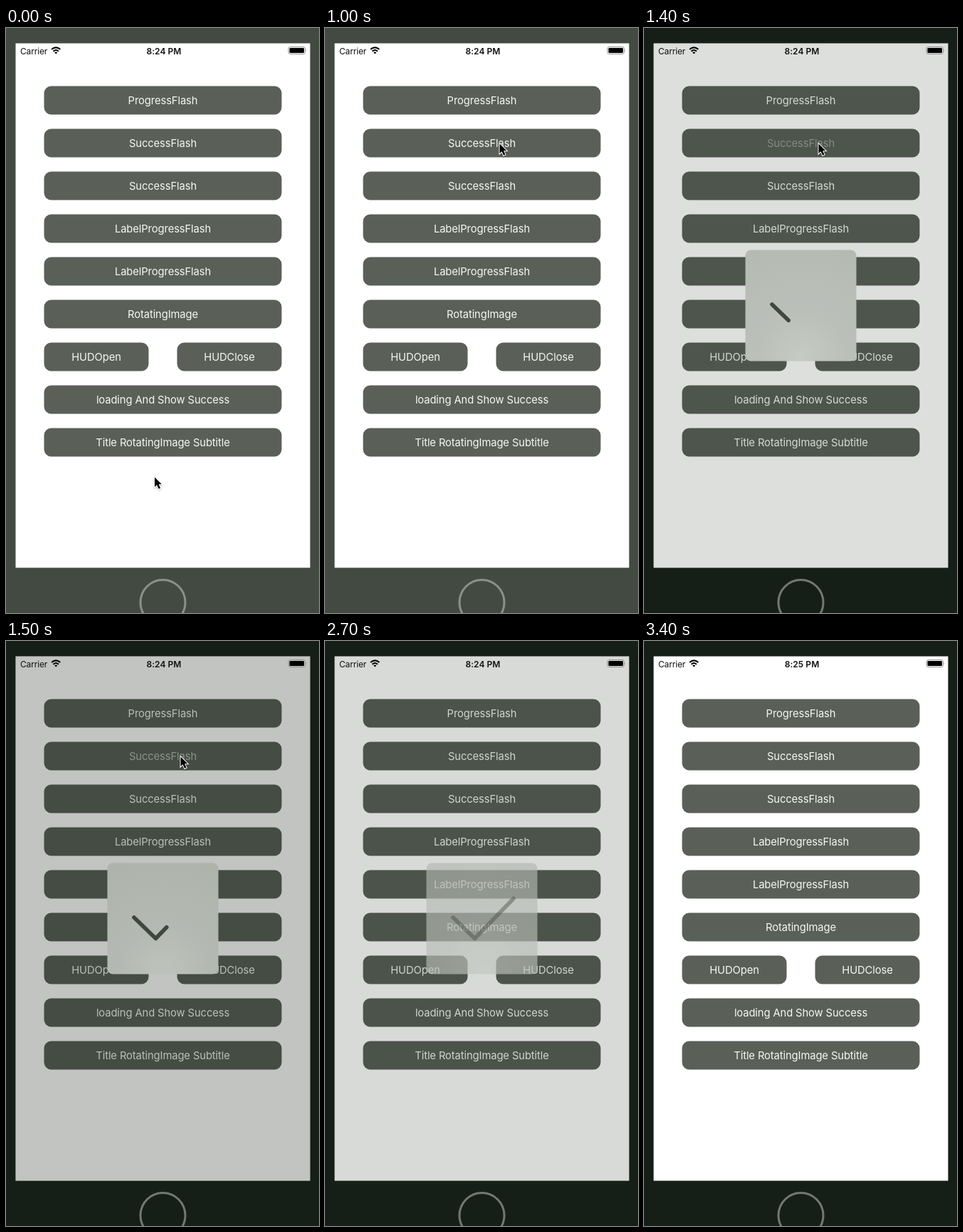
Animation of 440x821 px, one loop 3500 ms. Source, as an HTML page:

```html
<!DOCTYPE html>
<html lang="en">
<head>
<meta charset="utf-8">
<title>HUD demo</title>
<style>
  html, body { margin: 0; width: 100%; height: 100%; overflow: hidden; background: #434a42; }
  svg { display: block; width: 440px; height: 821px; }
  text { font-family: Inter, Roboto, sans-serif; }
  .label { font-size: 14.75px; letter-spacing: -.1px; fill: #f5f8f4; text-anchor: middle; }
  .status { font-size: 12px; letter-spacing: -.15px; fill: #111; }
  .clock { font-weight: 600; letter-spacing: .05px; text-anchor: middle; }
</style>
</head>
<body>
<svg viewBox="0 0 440 821">
  <defs>
    <radialGradient id="frost" gradientUnits="userSpaceOnUse" cx="222" cy="462" r="170">
      <stop offset="0" stop-color="#cdd2cb"/>
      <stop offset=".35" stop-color="#c3c8c1"/>
      <stop offset="1" stop-color="#bbc1b9"/>
    </radialGradient>
  </defs>
  <rect id="bezel" width="440" height="821"/>

  <!-- The phone sits half a pixel off the grid -->
  <g transform="translate(-.5 -.5)">
    <circle id="home" cx="221" cy="806.5" r="31.5" fill="none" stroke-width="3"/>
    <rect x="14" y="22" width="414" height="736" fill="#fff"/>
    <g id="buttons"></g>
    <rect id="shade" x="14" y="22" width="414" height="736" fill="#051005"/>

    <text class="status" x="20.5" y="37">Carrier</text>
    <g fill="none" stroke="#000" stroke-width="2.1">
      <path d="M64.6 30.6Q70.7 25 76.8 30.6"/>
      <path d="M67 33.2Q70.7 29.8 74.4 33.2"/>
      <path d="M70.7 37L68.7 34.8Q70.7 33.2 72.7 34.8Z" fill="#000" stroke="none"/>
    </g>
    <text id="clock" class="status clock" x="222.5" y="37"></text>
    <rect x="397.5" y="27" width="23.5" height="10" rx="2.6" fill="none" stroke="#8f958e"/>
    <rect x="399" y="28.5" width="20.5" height="7" rx="1.3"/>
    <path d="M422.2 30.3q1.5 1.7 0 3.4z" fill="#8f958e"/>

    <g id="panel">
      <rect x="143" y="312" width="156" height="156" rx="8" fill="url(#frost)"/>
      <rect id="dim" x="143" y="312" width="156" height="156" rx="8"/>
    </g>
    <path id="check" d="M180.5 388.5L211 418L265.5 362" pathLength="1" fill="none" stroke="#40473f"
      stroke-width="5.6" stroke-linecap="round" stroke-linejoin="round"/>
  </g>

  <path id="cursor" d="M0 0V13.6L3.1 10.7L5.6 16.3L8 15.2L5.6 9.8H9.8Z" fill="#000" stroke="#fff"
    stroke-width="2" paint-order="stroke" style="filter:drop-shadow(0 1px 1px #0004)"/>
</svg>
<script>
const LOOP = 3500, STEP = 100;
const PRESS = 1200, SHOW = 1300, HIDE = 2300, CURSOR_GONE = 1700, NEXT_MINUTE = 3200;
const $ = id => document.getElementById(id);
const set = (id, attrs) => {
  for (const name in attrs) $(id).setAttribute(name, attrs[name]);
};

const rows = [['ProgressFlash'], ['SuccessFlash'], ['SuccessFlash'], ['LabelProgressFlash'],
  ['LabelProgressFlash'], ['RotatingImage'], ['HUDOpen', 'HUDClose'],
  ['loading And Show Success'], ['Title RotatingImage Subtitle']];
const GAP = 40, WIDTH = 334;

function button(label, col, cols, row) {
  const w = (WIDTH - GAP * (cols - 1)) / cols;
  const x = 54 + col * (w + GAP), y = 82 + row * 60;
  return `<rect x="${x}" y="${y}" width="${w}" height="40" rx="10" fill="#5a6058"/>` +
    `<text class="label" x="${x + w / 2}" y="${y + 25.4}">${label}</text>`;
}
$('buttons').innerHTML = rows.flatMap((row, i) =>
  row.map((label, j) => button(label, j, row.length, i))).join('');
const pressed = document.querySelectorAll('.label')[1];

const progress = (t, from, length) => Math.min(1, Math.max(0, (t - from) / length));
const mix = (a, b, k) => a + (b - a) * k;
const smooth = k => k * k * (3 - 2 * k);
const easeOut = k => Math.sin(k * Math.PI / 2);
const easeIn = k => 1 - Math.cos(k * Math.PI / 2);

// A long sweep up, then a slow glide onto the button
function cursorAt(t) {
  const sweep = smooth(progress(t, 0, 600)), glide = progress(t, 600, 400);
  return [mix(209, 234.5, sweep) + 11 * glide, mix(630.5, 205, sweep) - 42.5 * glide];
}

function draw(t) {
  const active = t >= PRESS;
  const fade = 1 - easeIn(progress(t, HIDE, 560));
  const shade = .35 * easeOut(progress(t, SHOW, 400)) * fade;
  const shown = t > SHOW ? fade : 0;

  set('bezel', { fill: active ? '#161f17' : '#434a42' });
  set('home', { stroke: active ? '#737972' : '#8b918a' });
  $('clock').textContent = t < NEXT_MINUTE ? '8:24 PM' : '8:25 PM';
  set('shade', { opacity: shade });
  set('panel', { opacity: Math.sqrt(shown) });
  set('dim', { opacity: .3 * shade });
  set('check', { opacity: shown, 'stroke-dasharray': progress(t, SHOW, 375) + ' 2' });
  pressed.setAttribute('opacity', active ? mix(.2, 1, progress(t, SHOW, 400)) : 1);
  set('cursor', {
    transform: `translate(${cursorAt(t)})`,
    visibility: t < CURSOR_GONE ? 'visible' : 'hidden'
  });
}

const start = performance.now();
function tick() {
  const t = (performance.now() - start) % LOOP;
  draw(Math.floor(t / STEP) * STEP);
  requestAnimationFrame(tick);
}
tick();
</script>
</body>
</html>
```
